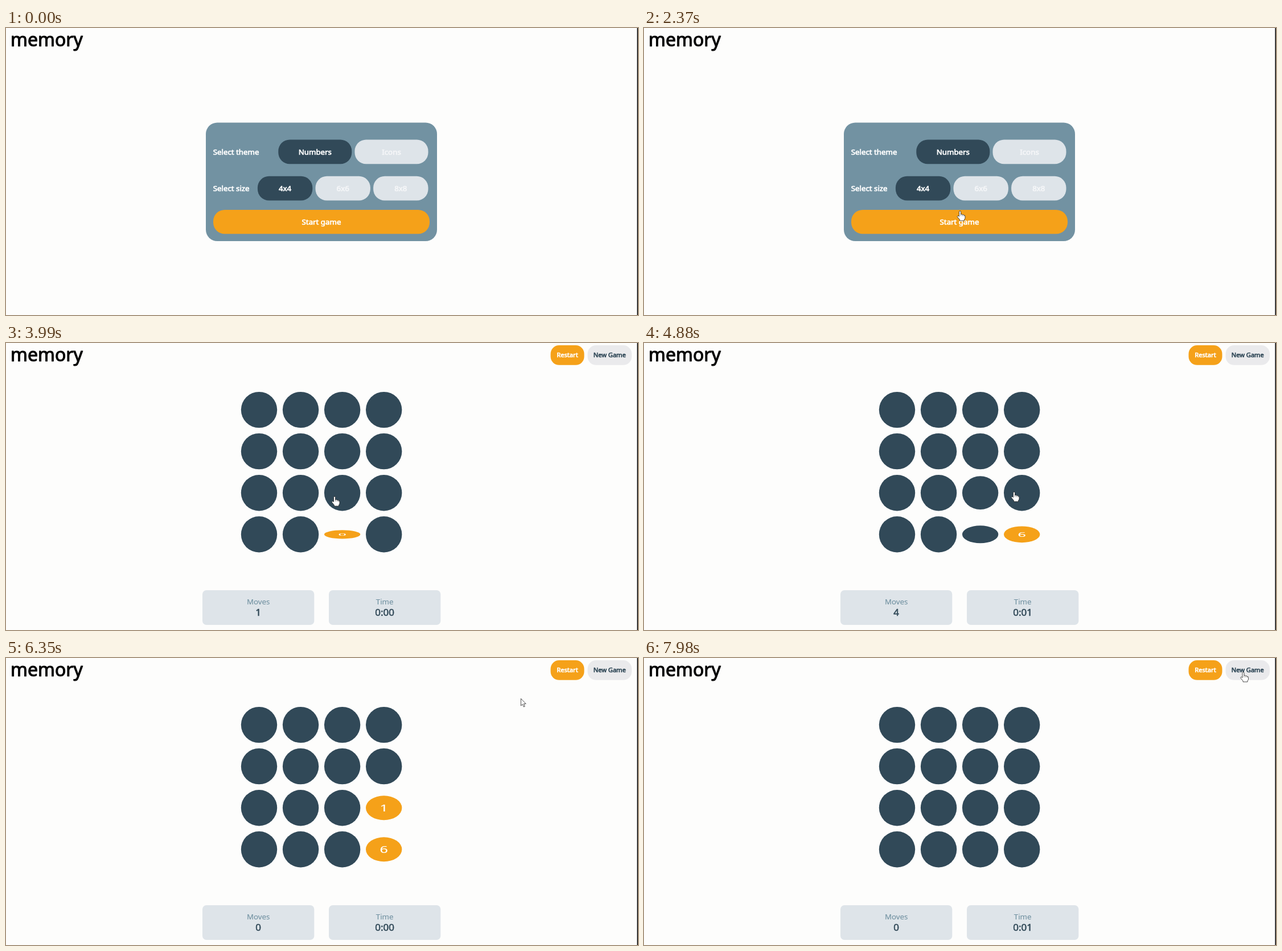
Write an HTML page that moves like this. It is 1110 by 505 pixels and loops after 8 s.

```html
<!DOCTYPE html>
<html lang="en">
<head>
<meta charset="utf-8">
<title>memory</title>
<style>
html, body { margin: 0; width: 100%; height: 100%; overflow: hidden; background: #fdfdfc; }
svg { display: block; width: 1110px; height: 505px; }
text { font-family: "Noto Sans", "Open Sans", sans-serif; stroke-linejoin: round; }
</style>
</head>
<body>
<svg id="stage" viewBox="0 0 1110 505"></svg>
<script>
const NS = 'http://www.w3.org/2000/svg';
const LOOP = 8000, FLIP = 1000;
const GAME_START = 3010, RESTART = 6165;
const DARK = '#314958', ORANGE = '#f5a119', LIGHT = '#dee4e9', SLATE = '#7292a2';
const FADED = '#f5f6f8', WHITE = '#fff';
const SMALL = 11.1, BODY = 13.3, LARGE = 17, TITLE = 32;
const RADIUS = 31.7, PITCH = 73.06;
const stage = document.getElementById('stage');

function add(parent, tag, attrs, content) {
  const node = document.createElementNS(NS, tag);
  for (const key in attrs) node.setAttribute(key, attrs[key]);
  if (content !== undefined) node.textContent = content;
  parent.appendChild(node);
  return node;
}

function box(parent, x, y, width, height, rx, fill) {
  return add(parent, 'rect', { x, y, width, height, rx, fill });
}

// A stroke in the text colour rounds and thickens the letters.
function label(parent, content, x, y, size, fill, weight = 0.7, anchor = 'middle') {
  return add(parent, 'text', {
    x, y, fill, 'font-size': size, 'text-anchor': anchor,
    stroke: fill, 'stroke-width': weight
  }, content);
}

const buttons = [];
function button(parent, content, x, y, width, height, radius, fill, ink, size = BODY) {
  box(parent, x, y, width, height, radius, fill);
  label(parent, content, x + width / 2, y + height / 2 + size * 0.36, size, ink);
  buttons.push({ parent, x, y, width, height });
}

const show = (node, on) => node.setAttribute('display', on ? 'inline' : 'none');

// Page
box(stage, 0, 0, 1110, 505, 0, '#fdfdfc');
label(stage, 'memory', 8, 32, TITLE, '#050505', 1.1, 'start');
const menu = add(stage, 'g', {});
const game = add(stage, 'g', {});

// Menu
function options(title, names, y, width) {
  const gap = 5.2;
  label(menu, title, 363.7, y + 26, BODY, WHITE, 0.7, 'start');
  names.forEach((name, i) => {
    const x = 741.5 + gap - (names.length - i) * (width + gap);
    button(menu, name, x, y, width, 42.8, 20, i ? LIGHT : DARK, i ? FADED : WHITE);
  });
}
box(menu, 351, 166.5, 406, 208.5, 20, SLATE);
options('Select theme', ['Numbers', 'Icons'], 196.5, 129);
options('Select size', ['4x4', '6x6', '8x8'], 260.8, 96.4);
button(menu, 'Start game', 364, 320, 380, 42.3, 20, ORANGE, WHITE);

// Game
button(game, 'Restart', 956.5, 4, 59, 34.8, 15, ORANGE, WHITE, SMALL);
button(game, 'New Game', 1021.5, 4, 77.5, 34.8, 15, '#eaeaec', DARK, SMALL);

function counter(title, x) {
  const width = 196.3, middle = x + width / 2;
  box(game, x, 435, width, 61, 7, LIGHT);
  label(game, title, middle, 460.3, BODY, SLATE, 0.1);
  return label(game, '', middle, 479.7, LARGE, DARK, 0.6);
}
const movesText = counter('Moves', 345);
const timeText = counter('Time', 567);

// Clicked cards in order, two to a try
const picks = [
  { card: 14, face: 0, at: 3657 },
  { card: 10, face: 3, at: 4078 },
  { card: 15, face: 6, at: 4503 },
  { card: 11, face: 1, at: 4870 }
];
// A pair turns back when the next try begins, or on restart.
picks.forEach((pick, i) => {
  const next = picks[i - i % 2 + 2];
  pick.close = next ? next.at : RESTART;
});

const cards = Array.from({ length: 16 }, (_, i) => {
  const x = 444.5 + (i % 4) * PITCH, y = 117.6 + Math.floor(i / 4) * PITCH;
  const node = add(game, 'g', {});
  const disc = add(node, 'circle', { r: RADIUS, fill: DARK });
  const pick = picks.find(p => p.card === i);
  const number = pick && label(node, pick.face, 0, 9, 25, WHITE, 0.3);
  return { x, y, node, disc, pick, number };
});

box(stage, 1108.4, 0, 1.6, 505, 0, '#111');

// Pointer
const pointer = add(stage, 'g', {
  fill: WHITE, stroke: '#222', 'stroke-width': 0.8, 'stroke-linejoin': 'round'
});
const arrow = add(pointer, 'path', { d: 'M0 0V12.6L2.9 9.9L4.9 14.6L6.9 13.7L5 9.2H8.8Z' });
const hand = add(pointer, 'g', {});
add(hand, 'path', {
  d: 'M-1.5 1.5Q-1.5 0 0 0T1.5 1.5V6Q4 4.7 4.4 6.6Q6.6 5.8 7 7.6Q9 7.2 9 9.2' +
     'V12Q9 14 7.5 15V17H-.5V15.2L-4.3 10.7Q-5.2 9.2-4 8.5Q-3 8-1.5 9.6Z'
});
add(hand, 'path', { d: 'M1.5 6V9M4.4 6.6V9.2M7 7.6V9.6', fill: 'none', 'stroke-width': 0.5 });

// Stops of the pointer; it glides from one to the next.
const stops = [
  { at: 400, rest: 0, x: 612, y: 440 },
  { at: 940, rest: 1190, x: 557, y: 340 },
  { at: 2370, rest: 640, x: 555, y: 322 },
  { at: 3410, rest: 310, x: 588, y: 333 },
  { at: 3990, rest: 90, x: 577, y: 270 },
  { at: 4480, rest: 80, x: 656, y: 334 },
  { at: 4860, rest: 260, x: 650, y: 262 },
  { at: 5630, rest: 0, x: 911, y: 54 },
  { at: 5840, rest: 330, x: 984, y: 24 },
  { at: 6720, rest: 340, x: 670, y: 211 },
  { at: 7980, rest: 20, x: 1052.5, y: 25 }
];

const clamp = v => Math.max(0, Math.min(1, v));
const mix = (a, b, k) => a + (b - a) * k;
const smooth = v => v * v * (3 - 2 * v);
const bezier = (a, b, u) => 3 * a * u * (1 - u) ** 2 + 3 * b * u * u * (1 - u) + u ** 3;

// The CSS "ease" curve
function ease(v) {
  v = clamp(v);
  let low = 0, high = 1;
  for (let i = 0; i < 22; i++) {
    const mid = (low + high) / 2;
    if (bezier(0.25, 0.25, mid) < v) low = mid; else high = mid;
  }
  return bezier(0.1, 1, low);
}

// A card closed early takes proportionally less time to return.
function openness({ at, close }, t) {
  if (t < at) return 0;
  if (t < close) return ease((t - at) / FLIP);
  const reached = ease((close - at) / FLIP);
  return reached * (1 - ease((t - close) / (FLIP * reached)));
}

function drawCard({ x, y, node, disc, pick, number }, t) {
  const cos = pick ? Math.cos(openness(pick, t) * Math.PI) : 1;
  node.setAttribute('transform', `translate(${x} ${y}) scale(1 ${Math.max(0.001, Math.abs(cos))})`);
  disc.setAttribute('fill', cos < 0 ? ORANGE : DARK);
  if (number) show(number, cos < 0);
}

// Cards cannot be clicked while the board resets.
function isClickable(x, y, t) {
  const playing = t >= GAME_START;
  const resetting = t >= RESTART && t < RESTART + FLIP;
  const overButton = buttons.some(b => b.parent === (playing ? game : menu) &&
    x >= b.x && x <= b.x + b.width && y >= b.y && y <= b.y + b.height);
  const overCard = playing && !resetting &&
    cards.some(card => Math.hypot(card.x - x, card.y - y) < RADIUS);
  return overButton || overCard;
}

function drawPointer(t) {
  const visible = t >= stops[0].at;
  show(pointer, visible);
  if (!visible) return;
  const i = stops.findLastIndex(stop => stop.at <= t);
  const from = stops[i], to = stops[i + 1] || from;
  const leave = from.at + from.rest;
  const k = to === from ? 0 : smooth(clamp((t - leave) / (to.at - leave)));
  const x = mix(from.x, to.x, k), y = mix(from.y, to.y, k);
  const clickable = isClickable(x, y, t);
  pointer.setAttribute('transform', `translate(${x} ${y})`);
  show(arrow, !clickable);
  show(hand, clickable);
}

function draw(t) {
  const playing = t >= GAME_START, restarted = t >= RESTART;
  show(menu, !playing);
  show(game, playing);
  if (playing) {
    const seconds = Math.floor((t - (restarted ? RESTART : GAME_START)) / 1000);
    timeText.textContent = '0:' + String(seconds).padStart(2, '0');
    movesText.textContent = restarted ? 0 : picks.filter(pick => pick.at <= t).length;
    cards.forEach(card => drawCard(card, t));
  }
  drawPointer(t);
}

const begin = performance.now();
function tick() {
  draw((performance.now() - begin) % LOOP);
  requestAnimationFrame(tick);
}
draw(0);
requestAnimationFrame(tick);
</script>
</body>
</html>
```
